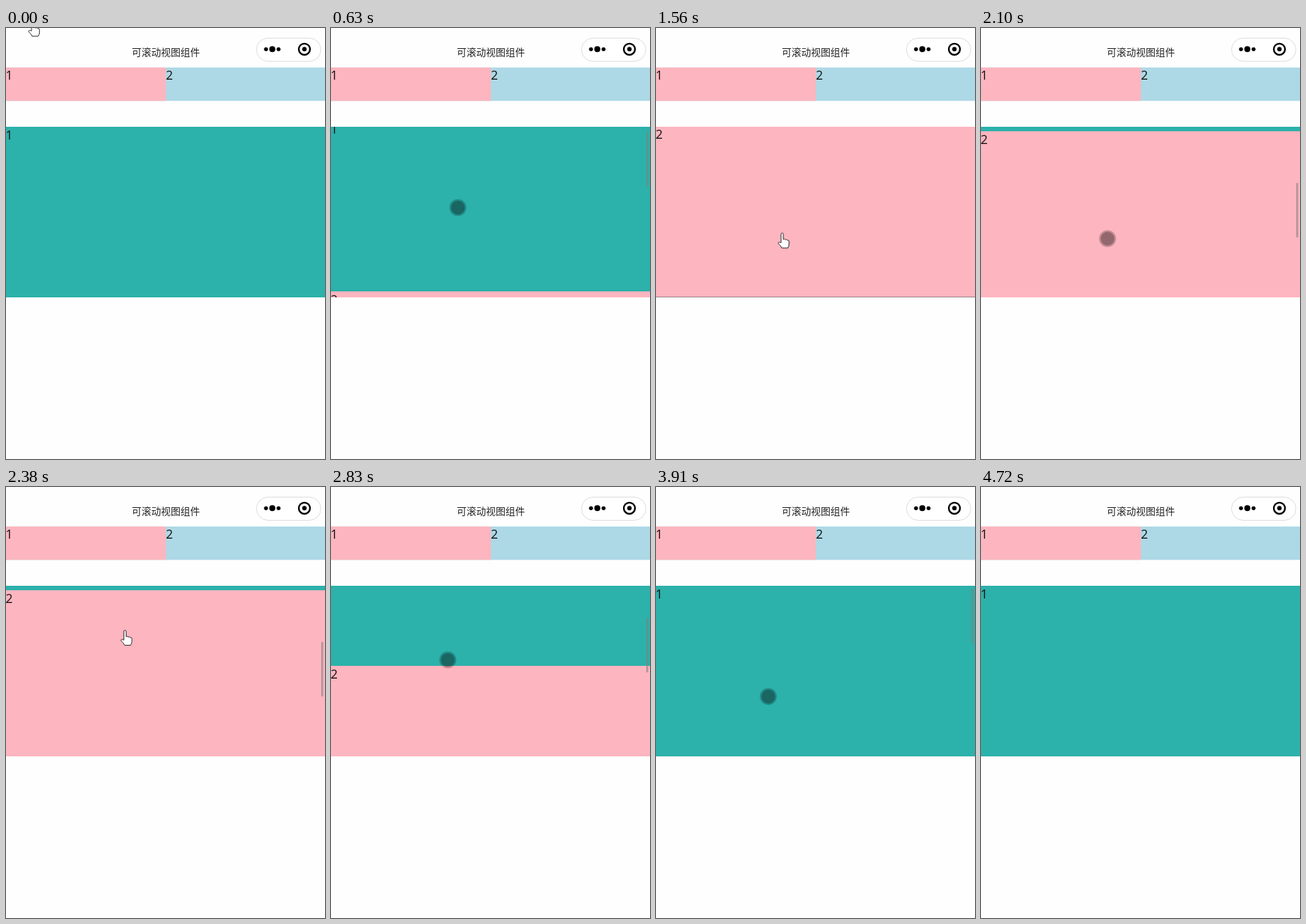
Animation of 426x576 px, one loop 5850 ms. Source, as an HTML page:

```html
<!DOCTYPE html>
<html lang="zh-CN">
<head>
<meta charset="utf-8">
<style>
  html, body { margin: 0; width: 100%; height: 100%; overflow: hidden; background: #fefefe; }
  svg { display: block; width: 426px; height: 576px; }
  .num { font: 16.5px "Open Sans", "Noto Sans", sans-serif; fill: #111; }
  .title { font: 13px "Noto Sans CJK SC", "Noto Sans CJK", sans-serif; fill: #222; text-anchor: middle; }
  .teal { fill: #2cb1ab; }
  .pink { fill: #fdb5bf; }
  .blue { fill: #add8e6; }
  .last { fill: #9c878c; }
</style>
</head>
<body>
<svg viewBox="0 0 426 576">
  <defs><clipPath id="view"><rect y="132" width="426" height="228"/></clipPath></defs>

  <text class="title" x="213.5" y="36.5">可滚动视图组件</text>
  <rect x="334.5" y="13.5" width="86" height="31" rx="15.5" fill="#fff" stroke="#dedede"/>
  <circle cx="347.2" cy="28.3" r="2.6"/>
  <circle cx="355.6" cy="28.3" r="4"/>
  <circle cx="364" cy="28.3" r="2.6"/>
  <circle cx="398.5" cy="28.3" r="7.5" fill="none" stroke="#000" stroke-width="2.3"/>
  <circle cx="398.5" cy="28.3" r="3"/>

  <rect class="blue" y="52.8" width="426" height="44.6"/>
  <rect class="pink" y="52.8" width="213.5" height="44.6"/>
  <text class="num" x="-.4" y="69">1</text>
  <text class="num" x="213.4" y="69">2</text>

  <g clip-path="url(#view)">
    <g id="list">
      <rect class="teal" y="132" width="426" height="228"/>
      <rect class="pink" y="360" width="426" height="228"/>
      <rect class="last" y="588" width="426" height="228"/>
      <text class="num" x="-.4" y="148.5">1</text>
      <text class="num" x="-.4" y="376.5">2</text>
    </g>
    <rect id="bar" x="421" y="136" width="2.5" height="73" rx="1" fill="#808080" fill-opacity=".6"/>
  </g>

  <g id="cursor">
    <g id="touch">
      <circle r="11.3" fill-opacity=".22"/>
      <circle r="9.2" fill-opacity=".26"/>
    </g>
    <path id="hand" fill="#fff" stroke="#333" stroke-linejoin="round"
      d="M-2 13V1.5a1.5 1.5 0 0 1 3 0V8.5q1.7-1.4 2.7.5q1.8-1 2.8.7q2-.6 2.2 1.5V15q0 2-1.7 5H-1q-1-3-5-6.3q.4-2.4 4-.7z"/>
  </g>
</svg>
<script>
const LOOP = 5850, STEP = 90, BAR_LINGER = 450;
const $ = id => document.getElementById(id);

// Each gesture eases the pointer and the list to a new rest; one that scrolls is a drag.
const gestures = [
  { from: 0, to: 540, x: 169, y: 240, scroll: 0 },
  { from: 581, to: 1020, x: 182.5, y: 242, scroll: 229 },
  { from: 1290, to: 1560, x: 169, y: 274, scroll: 229 },
  { from: 1920, to: 2100, x: 169, y: 281.5, scroll: 222 },
  { from: 2190, to: 2460, x: 156, y: 160, scroll: 222 },
  { from: 2514, to: 3090, x: 156, y: 290, scroll: 37 },
  { from: 3180, to: 3450, x: 147.5, y: 217, scroll: 37 },
  { from: 3450, to: 3820, x: 150, y: 280, scroll: 0 },
  { from: 4440, to: 4700, x: 37, y: 126, scroll: 0 }
];

const ease = p => p * p * (3 - 2 * p);
const mix = (a, b, p) => a + (b - a) * p;
const show = (el, on) => el.setAttribute("visibility", on ? "visible" : "hidden");
const move = (el, x, y) => el.setAttribute("transform", `translate(${x} ${y})`);

// The picture refreshes every 90 ms, running 30 ms late from 1020 ms on.
function tick(time) {
  const late = time < 1020 ? 0 : 30;
  return Math.floor((time - late) / STEP) * STEP + late;
}

function poseAt(t) {
  const pose = { x: 36, y: -9, scroll: 0, down: false, barEnd: 0 };
  for (const g of gestures) {
    if (g.from > t) break;
    const p = ease(Math.min(1, (t - g.from) / (g.to - g.from)));
    pose.down = g.scroll !== pose.scroll;
    if (pose.down) pose.barEnd = g.to + BAR_LINGER;
    for (const key of ["x", "y", "scroll"]) pose[key] = mix(pose[key], g[key], p);
  }
  return pose;
}

function draw(time) {
  const t = tick(time);
  const { x, y, scroll, down, barEnd } = poseAt(t);
  const top = Math.round(scroll);
  const visible = t < gestures[gestures.length - 1].to;
  move($("list"), 0, -top);
  move($("bar"), 0, top * 0.32);
  move($("cursor"), x, y);
  show($("bar"), t < barEnd);
  show($("touch"), visible && down);
  show($("hand"), visible && !down);
}

const start = performance.now();
function frame() {
  draw((performance.now() - start) % LOOP);
  requestAnimationFrame(frame);
}
frame();
</script>
</body>
</html>
```
